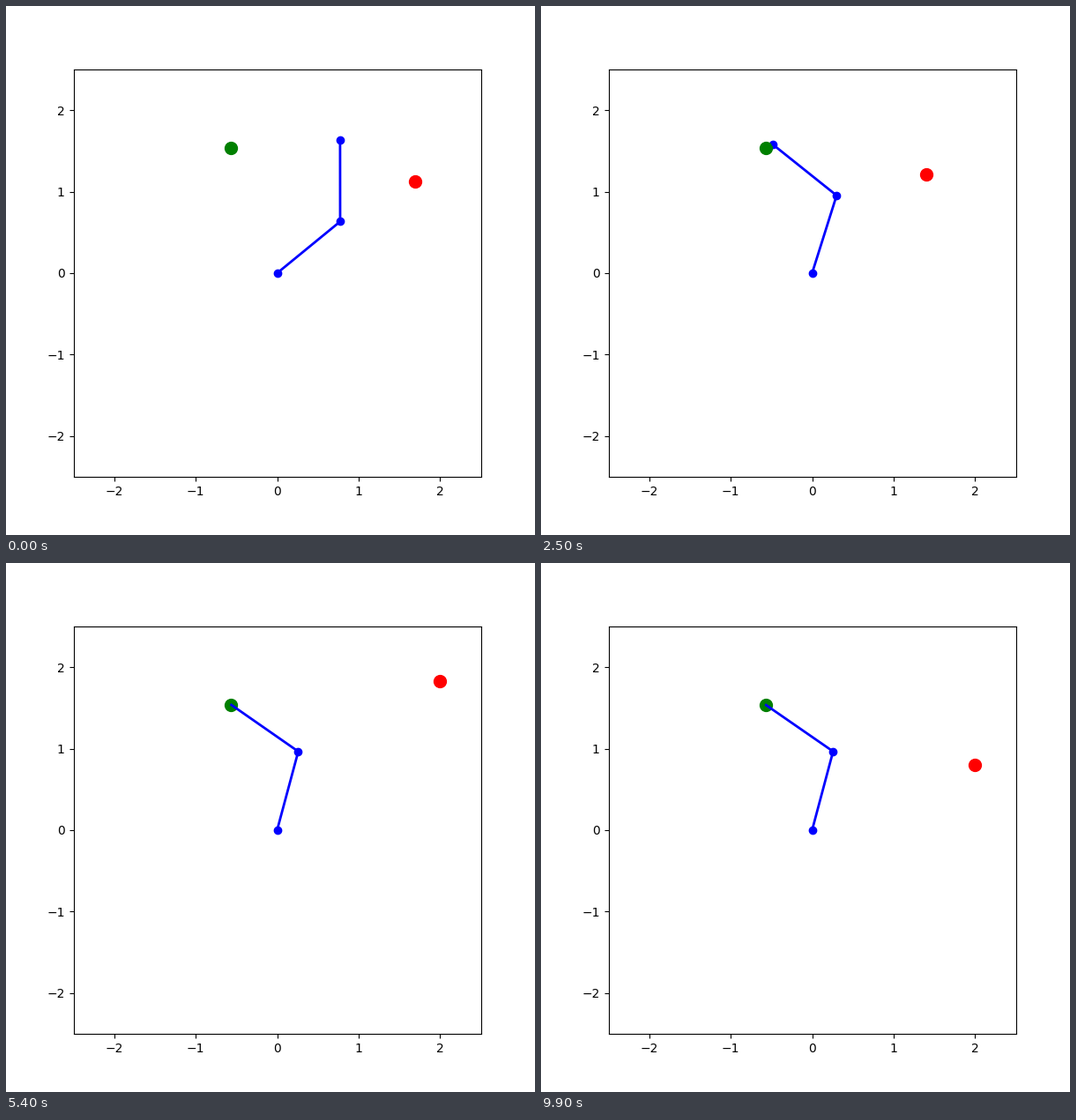
A matplotlib script that plays this animation: 600x600 px, repeating every 10 s.

```python
import numpy as np
import matplotlib.pyplot as plt
from matplotlib.animation import FuncAnimation

FRAMES = 100
LINK = 1.0
GOAL = np.array([-0.565, 1.535])
START = np.radians([39.3, 50.75])
GAIN = 0.1

# The red dot keeps one velocity for 20 frames at a time.
KNOTS = [0, 20, 40, 60, 80, 100]
DOT_X = [1.699, 1.194, 2.0205, 2.0205, 2.0205, 2.0205]
DOT_Y = [1.121, 1.0, 1.8377, 1.8236, 1.4708, 0.763]
LIMIT = 2.0


def solve_angles(point):
    """Joint angles that place the tip of the arm on a point."""
    x, y = point
    bend = np.arccos((x * x + y * y) / (2 * LINK ** 2) - 1)
    return np.array([np.arctan2(y, x) - bend / 2, bend])


def arm_points(angles):
    """Shoulder, elbow and tip as x and y lists."""
    a = np.cumsum(angles)
    xs = np.concatenate([[0], np.cumsum(LINK * np.cos(a))])
    ys = np.concatenate([[0], np.cumsum(LINK * np.sin(a))])
    return xs, ys


END = solve_angles(GOAL)

fig, ax = plt.subplots(figsize=(6, 6), dpi=100)
ax.set_xlim(-2.5, 2.5)
ax.set_ylim(-2.5, 2.5)
ax.set_aspect("equal")

joints, = ax.plot([], [], "o", color="blue", zorder=2)
ax.plot(*GOAL, "o", color="green", markersize=10, zorder=3)
links, = ax.plot([], [], "-", color="blue", lw=2, zorder=4)
dot, = ax.plot([], [], "o", color="red", markersize=10, zorder=3)


def update(i):
    # Proportional control: the angle error shrinks by GAIN each step.
    xs, ys = arm_points(END + (START - END) * (1 - GAIN) ** i)
    joints.set_data(xs, ys)
    links.set_data(xs, ys)
    x = min(np.interp(i, KNOTS, DOT_X), LIMIT)
    dot.set_data([x], [np.interp(i, KNOTS, DOT_Y)])
    return joints, links, dot


anim = FuncAnimation(fig, update, frames=FRAMES, interval=100, repeat=True)
plt.show()
```
